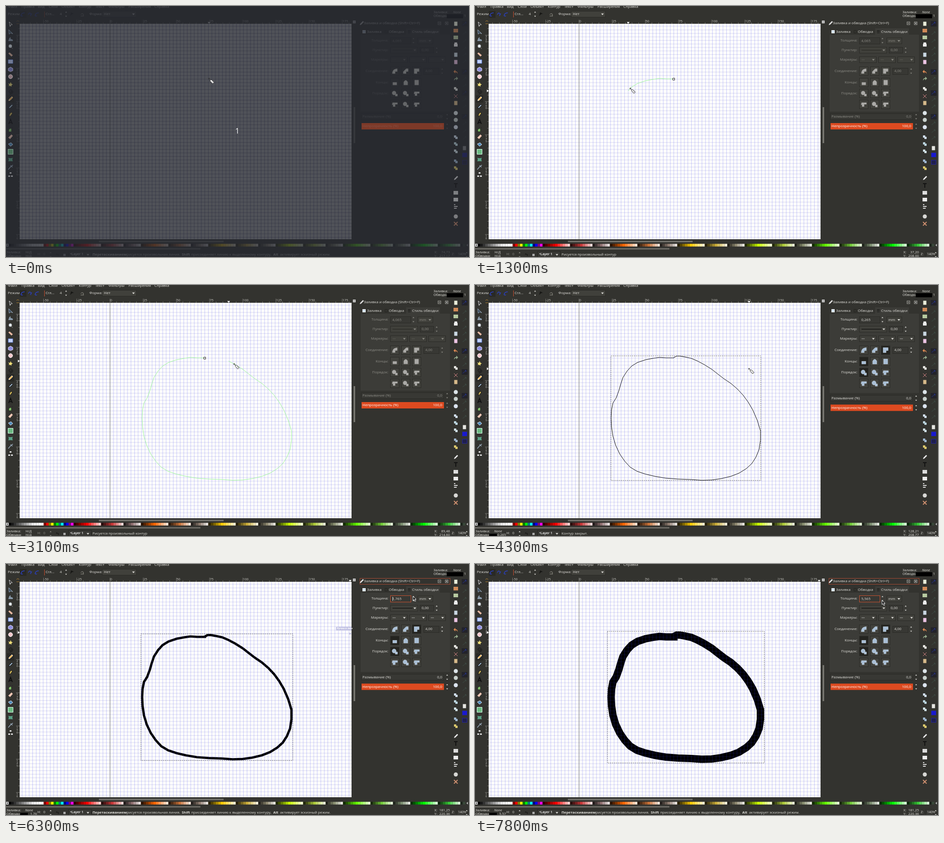
Animation, 1017 px wide and 551 px high, one loop 8000 ms. Source, as an HTML page with a canvas:

```html
<!DOCTYPE html>
<html lang="ru">
<head>
<meta charset="utf-8">
<style>
html, body { margin: 0; width: 100%; height: 100%; overflow: hidden; background: #33332f; }
canvas { display: block; }
</style>
</head>
<body>
<canvas id="stage" width="1017" height="551"></canvas>
<script>
const ctx = document.getElementById('stage').getContext('2d');
const BG = '#33332f', PANEL = '#3c3c38', FIELD = '#383834', EDGE = '#2a2a26';
const LIGHT = '#e0dfda', DIM = '#8d8c86', ORANGE = '#dd4a20', STEEL = '#a9bfd6';
const MM = 2.917, ZERO_X = 228, TOP_Y = 159, TOP_MM = 217.34;
const mmX = x => (x - ZERO_X) / MM, mmY = y => TOP_MM + (TOP_Y - y) / MM;
const pxX = v => ZERO_X + v * MM, pxY = v => TOP_Y + (TOP_MM - v) * MM;
const fmt = (v, n) => v.toFixed(n).replace('.', ',');

const OUTLINE = [
  [437,160],[420,160],[405,159],[391,161],[375,164],[357,170],[344,178],[334,189],[325,203],
  [320,218],[316,232],[310,248],[303,259],[300,274],[299,292],[300,312],[303,332],[309,352],
  [318,371],[329,387],[341,400],[356,409],[374,415],[395,420],[419,424],[446,426],[475,427],
  [498,428.7],[520,428],[541,425],[562,420],[580,413],[596,403],[608,392],[617,378],[624,361],
  [627,341],[627,320],[620,297],[610,274],[600,257],[589,242],[576,228],[562,216],[547,206],
  [534,196],[520,185],[504,175],[489,167],[475,161],[461,158],[450,156],[443,156],[437,159]];
const BOX = { left: 299, top: 156, right: 627.4, bottom: 428.7 };

// Each key: [time, value, ...]; values between keys are linear.
function along(keys, t) {
  let i = keys.findIndex(k => k[0] > t);
  if (i < 0) return keys[keys.length - 1].slice(1);
  if (i === 0) return keys[0].slice(1);
  const a = keys[i - 1], b = keys[i], f = (t - a[0]) / (b[0] - a[0]);
  return a.slice(1).map((v, n) => v + (b[n + 1] - v) * f);
}
function latest(keys, t) {
  return keys.reduce((v, k) => k[0] <= t ? k[1] : v, keys[0][1]);
}
const DRAWN = [[800, 0], [1300, 6.75], [1600, 13], [3100, 48], [3300, 53]];
const POINTER = [[3400, 437, 159], [4300, 602, 184], [4600, 756, 150], [4800, 893, 70],
  [7000, 893, 70], [7200, 893, 79]];
const WIDTHS = [[0, 0.265], [5700, 0.365], [5800, 0.465], [5900, 0.665], [6100, 1.065],
  [6200, 1.365], [6300, 1.765], [6400, 2.765], [6500, 4.265], [6700, 5.765], [7600, 5.665], [7800, 5.565]];

function pointAt(i) {
  const n = Math.min(Math.floor(i), OUTLINE.length - 2), f = i - n;
  const [a, b] = [OUTLINE[n], OUTLINE[n + 1]];
  return [a[0] + (b[0] - a[0]) * f, a[1] + (b[1] - a[1]) * f];
}

function rect(x, y, x2, y2, fill, stroke) {
  if (fill) { ctx.fillStyle = fill; ctx.fillRect(x, y, x2 - x, y2 - y); }
  if (stroke) {
    ctx.strokeStyle = stroke; ctx.lineWidth = 1;
    ctx.strokeRect(x + .5, y + .5, x2 - x - 1, y2 - y - 1);
  }
}
function text(s, x, y, color = LIGHT, { size = 8, style = '', align = 'left' } = {}) {
  ctx.font = `${style} ${size}px "Open Sans", "Noto Sans", sans-serif`;
  ctx.textAlign = align; ctx.textBaseline = 'middle'; ctx.fillStyle = color;
  ctx.fillText(s, x, y);
}
function icon(d, x, y, fill, stroke, width = 1) {
  const p = new Path2D(d);
  ctx.save(); ctx.translate(x, y);
  if (fill) { ctx.fillStyle = fill; ctx.fill(p); }
  if (stroke) { ctx.strokeStyle = stroke; ctx.lineWidth = width; ctx.stroke(p); }
  ctx.restore();
}
const DOWN = 'M-3-1.5H3L0 2Z', UP = 'M-2 1H2L0-1.5Z', LOW = 'M-2-1H2L0 1.5Z';
function spin(x, y, color) { icon(UP, x, y - 4.5, color); icon(LOW, x, y + 4.5, color); }
function combo(x, y, x2, color) {
  rect(x, y - 7, x2, y + 7, '#40403b', EDGE); icon(DOWN, x2 - 7, y, color);
}

const DISC = 'M4.5 0A4.5 4.5 0 1 1-4.5 0A4.5 4.5 0 1 1 4.5 0Z', SQUARE = 'M-5-4H5V4H-5Z';
const PAGE = 'M-3.5-4.5H3.5V4.5H-3.5Z', PEN = 'M-4 4L-3 1L3-5L5-3L-1 3Z';
const HOOK = 'M4 4Q4-2-1-2V-5L-5-1L-1 3V0Q2 0 4 4Z', PAIR = 'M-4-4H1V1H-4ZM-1-1H4V4H-1Z';
const CURVE = 'M-4 4Q-4-3 4-3M-4 4L0 4', CROSS = 'M-4-4L4 4M4-4L-4 4';
const TOOLS = [
  [40, 'M-3-5L4 1L0 1.5L-1 5Z', '#222', '#ddd'], [57, 'M-4-5L5 4L0 2L-3 5Z', '#345', '#9ab'],
  [73, 'M-5 4H5V1L0-1V-5L-3-2Z', '#8798a8'], [89, 'M3-1A3.5 3.5 0 1 1-4-1A3.5 3.5 0 1 1 3-1ZM2 2L5 5', '#e8f1fa', '#888'],
  [106, 'M-5-2L-2-4L5 2L2 5Z', '#e6b9a2'], [122, SQUARE, '#c3d3ff', '#5877c8'],
  [139, 'M0-5L5-2V3L0 5L-5 3V-2Z', '#8f8fe0', '#dde'], [155, DISC, '#f6c8cc', '#fff'],
  [172, 'M0-5L2-1L5 0L2 2L2 5L-1 3L-4 4L-3 1L-5-2L-1-1Z', '#f2e07a'],
  [188, 'M0 0Q3-2 2 2Q-4 4-3-2Q1-7 5 0Q4 6-2 5', null, '#111'], [204, PEN, '#f5a834', '#fff'],
  [221, PEN, '#9fb8d0', '#111'], [238, 'M-3 5L-2-1L2-5L4-2L0 3Z', '#c8b058', '#111'],
  [254, 'M-4 5L0-5L4 5M-2 2H3', null, '#111', 2], [271, 'M-4 5V0L-1-2H2V5ZM3-4H5', '#7fbf67', '#222'],
  [287, 'M-5 2L2-5L5-2L-1 5Z', '#f0c7b5'], [304, 'M-5-1L1-4L5 0L0 4Z', '#4f8ebc', '#dde'],
  [320, 'M-5.5-5.5H5.5V5.5H-5.5Z', '#6cba82', '#dfe'], [337, 'M-5-4Q0-2 5-4Q3 0 5 4Q0 3-5 4Q-3 0-5-4Z', '#5aa085'],
  [354, 'M-5 5L1-2M0-4L4 0M2-2L5-5', null, '#9ab', 1.5], [370, 'M-2-5H2V-2H-2ZM-5 2H-1V5H-5ZM1 2H5V5H1Z', '#ddd']];
const COMMANDS = [
  [39, PAGE, '#e9edda'], [54, SQUARE, '#d08a58'], [69, SQUARE, '#b7c9a0'], [85, 'M-4-2H4V4H-4ZM-3-5H3V-2H-3Z', '#eee'],
  [107, PAGE, '#c9d7e2'], [123, PAGE, '#edc4e4'], [145, HOOK, '#df8a54'], [160, 'M-4 4Q-4-2 1-2V-5L5-1L1 3V0Q-2 0-4 4Z', '#9ab090'],
  [182, PAIR, '#e4e4df'], [198, CROSS, null, '#d88'], [213, PAGE, '#d6b98a'], [235, DISC, '#dce4e8'], [250, DISC, '#c8d0cc'],
  [266, DISC, '#dce4f0'], [288, PAIR, '#cfdcea'], [303, PAIR, '#b9d3dd'], [319, PAIR, '#cfdfe4'], [341, PAIR, '#9db6d0'],
  [356, PAIR, '#d8c56b'], [378, PEN, '#eee'], [394, 'M-4-4H4M0-4V5', null, '#111', 2], [410, SQUARE, '#ddd'],
  [425, SQUARE, '#eee'], [440, 'M-4-4H-1M-4 0H4M-4 4H2', null, '#ddd', 2], [462, DISC, '#d8d8d5'], [478, CROSS, null, '#d09070', 2]];
const SNAPS = [[39, 1], [60, 0], [77, 0], [94, 0], [107, 0], [122, 0], [145, 1], [160, 0], [175, 0],
  [191, 1], [206, 0], [221, 0], [243, 1], [258, 0], [275, 0], [290, 0]];
const JOINS = [['M-5.5 5.5Q-5.5-5 5.5-5.5V1H1V5.5Z', 854, 143], ['M-5.5 5.5V1L1-5.5H5.5V1H1V5.5Z', 878, 143],
  ['M-5.5 5.5V-5.5H5.5V1H1V5.5Z', 902, 143], ['M-4.5-.5H4.5V5.5H-4.5Z', 854, 168],
  ['M-4.5 5.5V-1Q0-9 4.5-1V5.5Z', 878, 168], ['M-4.5-5.5H4.5V5.5H-4.5Z', 902, 168]];
const MARK = 'M-6-1A4.5 4.5 0 1 1 3-1A4.5 4.5 0 1 1-6-1ZM1 1H6V6H1Z', BEND = 'M-5-4H6V0H1V5H-4V1H-6Z';
const ORDERS = [[MARK, 854, 192], [MARK, 878, 192], [BEND, 902, 192], [BEND, 854, 216], [MARK, 878, 216], [BEND, 902, 216]];

function drawIcons(active) {
  rect(2, 196, 18, 212, '#292925');
  for (const [y, d, fill, stroke, w] of TOOLS) icon(d, 10, y, fill, stroke, w);
  for (const [y, d, fill, stroke, w] of COMMANDS) icon(d, 988, y, fill, stroke, w);
  for (const [d, x, y] of [...JOINS, ...ORDERS]) icon(d, x, y, active ? STEEL : '#aaa9a6', active ? '#d5e2ef' : null, .5);
}

function drawGrid(vertical, horizontal) {
  const step = MM * 25.4 / 9.6;
  ctx.fillStyle = vertical;
  for (let x = ZERO_X - 25 * step; x < 759; x += step) ctx.fillRect(x, 39, .7, 473);
  ctx.fillStyle = horizontal;
  for (let y = pxY(0) - 97 * step; y < 512; y += step) if (y > 39) ctx.fillRect(30, y, 729, .7);
}

function drawRulers(x, y) {
  ctx.save();
  ctx.beginPath(); ctx.rect(22, 29, 737, 483); ctx.clip();
  ctx.fillStyle = '#a5a49f';
  for (let v = -70; v <= 185; v += 5) {
    const major = v % 25 === 0, h = major ? 9 : 3;
    if (pxX(v) > 30) ctx.fillRect(pxX(v), 39 - h, .6, h);
    if (major && pxX(v) > 30) text(v, pxX(v) + 1, 34, '#c9c8c3', { size: 7 });
    ctx.fillStyle = '#a5a49f';
  }
  for (let v = 95; v <= 255; v += 5) {
    const major = v % 25 === 0, w = major ? 8 : 3;
    ctx.fillRect(30 - w, pxY(v), w, .6);
    if (major) [...String(v)].forEach((c, i) => text(c, 23, pxY(v) + 4 + i * 5.5, '#c9c8c3', { size: 6 }));
    ctx.fillStyle = '#a5a49f';
  }
  ctx.restore();
  icon('M-3-2H3L0 2Z', Math.min(x, 756), 37, '#fff');
  icon('M-2-3V3L2 0Z', 28, y, '#fff');
}

function drawPalette() {
  const grays = [0, 10, 20, 30, 40, 50, 60, 70, 80, 90, 92.5, 95, 97.5, 100].map(l => `hsl(0 0% ${l}%)`);
  const basics = ['maroon', 'red', 'olive', 'yellow', 'green', 'lime', 'teal', 'aqua', 'navy', 'blue', 'purple', 'fuchsia'];
  const colors = [...grays, ...basics];
  for (let hue = 0; hue <= 120; hue += 24)
    for (const [sat, n] of [[100, 12], [57, 10], [12, 8]])
      for (let i = 1; i < n; i++) colors.push(`hsl(${hue} ${sat}% ${i / n * 100}%)`);
  rect(0, 522, 6, 528, '#ddd'); icon('M-2-2L2 2M2-2L-2 2', 3, 525, null, '#333');
  colors.forEach((c, i) => { const x = 6 + i * 5.48; if (x < 1008) rect(x, 522, Math.min(x + 5.5, 1009), 528, c); });
  icon('M1.5-3V3L-1.5 0Z', 1013, 525, '#ccc');
}

function drawToolbars() {
  [['Файл', 4], ['Правка', 34], ['Вид', 70], ['Слой', 94], ['Объект', 122], ['Контур', 160], ['Текст', 196],
    ['Фильтры', 225], ['Расширения', 269], ['Справка', 326]].forEach(([s, x]) => text(s, x, 1.5));
  text('Режим:', 4, 18);
  rect(30, 11, 45, 26, '#292925');
  for (const x of [37, 53, 68]) icon(x === 53 ? 'M-4 1Q-1-6 2 0L4-1M2 0L1 4' : CURVE, x, 18, null, '#2a3fc0', 1.5);
  rect(84, 12, 85, 25, '#d05030');
  text('Сгл...', 87, 18); text('4', 118, 18); spin(132, 18, LIGHT);
  icon('M-4 4L-2-4L4-1L0 0Z', 145, 18, '#161614'); icon('M-3 3H4M-3 0Q0-4 3-1V3', 167, 19, null, '#99988f');
  text('Форма:', 183, 18); combo(211, 18, 287, LIGHT); text('Нет', 215, 18);
  text('Заливка:', 939, 14, LIGHT, { size: 7.5 }); text('None', 982, 14, LIGHT, { size: 7.5, style: 'italic' });
  text('Обводка:', 939, 22, LIGHT, { size: 7.5 }); rect(968, 18, 1004, 27, '#000'); text('1', 1006, 22, LIGHT, { size: 7.5 });
  icon('M-3-2L0-4L3-2M-3 3H3', 26, 36, null, '#b08030'); rect(762, 32, 768, 38, '#aaa', '#ddd');
  for (const [y, on] of SNAPS) {
    if (on) rect(1001, y - 6, 1014, y + 6, '#23232a');
    icon('M-4 3L3-3M1-4L4-3L3 0', 1007, y, null, on ? '#26358e' : '#3d4d46');
  }
  icon(PAGE, 1007, 312, '#e5e5e0');
  for (const y of [327, 343]) rect(1002, y - 5, 1013, y + 5, y === 327 ? '#1919d0' : '#20204c', '#2222a0');
}

function drawPanel(t, width) {
  const active = t >= 3500, focus = t >= 5600, c = active ? LIGHT : DIM, right = { align: 'right' };
  if (focus) rect(777, 31, 976, 45, null, '#a64a33');
  icon(PEN, 781, 38, '#ddd'); text('Заливка и обводка (Shift+Ctrl+F)', 786, 38);
  for (const x of [952, 968]) rect(x - 3.5, 34.5, x + 3.5, 41.5, null, '#aaa9a4');
  icon('M-1.5-1.5L1.5 1.5M1.5-1.5L-1.5 1.5', 968, 38, null, '#ddd');
  icon('M-1.5 0H1.5', 952, 38, null, '#ddd');
  rect(779, 63, 975, active ? 237 : 232, PANEL); rect(879, 49, 953, 64, PANEL);
  rect(783, 53, 790, 60, '#cfe0f4', '#fff'); text('Заливка', 793, 56.5);
  rect(832, 53, 838, 60, null, '#24241f'); text('Обводка', 841, 56.5);
  icon('M-3-2H3M-3 0H3M-3 3H3', 886, 56, null, '#171714'); text('Стиль обводки', 892, 56.5);
  [['Толщина:', 76], ['Пунктир:', 97], ['Маркеры:', 118], ['Соединение:', 143], ['Концы:', 168], ['Порядок:', 192]]
    .forEach(([s, y]) => text(s, 840, y, c, right));
  rect(844, 69, 890, 84, FIELD, focus ? '#c9512f' : EDGE);
  text(active ? fmt(width, 3) : '4,065', 848.5, 76.5, c); spin(895, 76, c);
  if (focus && t < 6900) rect(849, 72, 850, 81, LIGHT);
  combo(904, 76.5, 938, c); text('mm', 908, 76.5, c);
  combo(844, 97, 905, c); rect(849, 96.5, 893, 97.5, active ? '#000' : '#22221f');
  rect(909, 90, 940, 104, FIELD, EDGE); text('0,00', 913, 97, c); spin(946, 97, c);
  for (const x of [844, 886, 928]) { combo(x, 118, x + 38, c); rect(x + 5, 117.5, x + 12, 118.5, active ? '#aaa' : '#5b5b55'); }
  for (const [, x, y] of [...JOINS, ...ORDERS]) {
    const on = active && (x === 902 && y === 143 || x === 854 && (y === 168 || y === 192));
    rect(x - 10, y - 10, x + 10, y + 10, on ? '#242420' : '#42423d', EDGE);
  }
  rect(917, 136, 952, 151, FIELD, EDGE); text('4,00', 921, 143, c); spin(958, 143, c);
  const shift = active ? 5.5 : 0;
  rect(780, 236 + shift, 962, 250 + shift, FIELD, EDGE);
  text('Размывание (%)', 783, 243 + shift, c); text('0,0', 958, 243 + shift, c, right); spin(969, 243 + shift, c);
  rect(781, 257 + shift, 962, 271 + shift, ORANGE);
  text('Непрозрачность (%)', 783, 264 + shift, '#fff'); text('100,0', 958, 264 + shift, '#fff', right); spin(969, 264 + shift, c);
}

function drawStatus(t, width, x, y) {
  const small = { size: 7.5 }, right = { size: 7.5, align: 'right' }, active = t >= 3500;
  text('Заливка:', 1, 541, LIGHT, small); text('Обводка:', 1, 549, LIGHT, small);
  if (active) {
    text('None', 42, 541, LIGHT, { size: 7.5, style: 'italic' });
    rect(31, 546, 48, 551, '#000'); text(fmt(width, width < 1 ? 3 : 2), 68, 549, LIGHT, right);
  } else { text('Н/Д', 43, 541, LIGHT, small); text('Н/Д', 43, 549, LIGHT, small); }
  text('H:', 69, 545.5, active ? LIGHT : DIM, small); text('0', 82, 545.5, active ? LIGHT : DIM, small);
  spin(98, 546, active ? LIGHT : DIM);
  icon('M-3-1H2V3M-3-1L-1-3', 113, 546, null, '#111'); rect(126, 544, 131, 549, '#aaa');
  rect(137, 538, 188, 553, FIELD, '#242420'); text('•Layer 1', 141, 545.5, '#fff', { size: 7.5, style: '600' }); icon(DOWN, 180, 546, LIGHT);
  const bold = { size: 7.8, style: 'bold' }, plain = { size: 7.8 };
  if (t < 700 || t >= 5400) {
    text('Перетаскиванием', 190, 545.5, LIGHT, bold); text('рисуется произвольная линия.', 265, 545.5, LIGHT, plain);
    text('Shift', 386, 545.5, LIGHT, bold); text('присоединяет линию к выделенному контуру,', 407, 545.5, LIGHT, plain);
    text('Alt', 587, 545.5, LIGHT, bold); text('активирует эскизный режим.', 602, 545.5, LIGHT, plain);
  } else text(active ? 'Контур закрыт.' : 'Рисуется произвольный контур', 190, 545.5, LIGHT, plain);
  text('X:', 941, 541, LIGHT, small); text('Y:', 941, 549, LIGHT, small);
  text(fmt(mmX(x), 2), 975, 541, LIGHT, right); text(fmt(mmY(y), 2), 975, 549, LIGHT, right);
  text('Z:', 979, 545.5, LIGHT, small); rect(990, 538, 1008, 553, FIELD, EDGE); text('140%', 993, 545.5, LIGHT, { size: 7 }); spin(1012, 546, LIGHT);
}

function drawCanvas(t, width, drawn) {
  rect(30, 39, 759, 512, '#fdfdfc');
  if (t >= 3500) {
    ctx.beginPath(); OUTLINE.forEach(p => ctx.lineTo(...p)); ctx.closePath();
    ctx.strokeStyle = '#000'; ctx.lineWidth = Math.max(1, width * MM); ctx.stroke();
  }
  drawGrid('rgba(40,40,255,.34)', 'rgba(65,65,190,.27)');
  rect(228, 39, 229, 512, '#70717c');
  if (t >= 800 && t < 3500) {
    ctx.beginPath(); OUTLINE.slice(0, Math.floor(drawn) + 1).forEach(p => ctx.lineTo(...p));
    ctx.lineTo(...pointAt(drawn));
    ctx.strokeStyle = '#9cf797'; ctx.lineWidth = 1; ctx.stroke();
    rect(434, 158, 439, 163, '#fff', '#222');
  }
  if (t >= 3500) {
    const h = width * MM / 2;
    ctx.strokeStyle = '#333'; ctx.lineWidth = .8; ctx.setLineDash([2.1, 2.1]);
    ctx.strokeRect(BOX.left - h, BOX.top - h, BOX.right - BOX.left + 2 * h, BOX.bottom - BOX.top + 2 * h);
    ctx.setLineDash([]);
  }
  if (t >= 4600 && t < 6700) {
    rect(725, 138, 759, 146, '#c3c3e3'); text('Ручка к лин', 727, 142, '#fff', { size: 5.5, style: 'bold' });
    icon('M-2-2L2 2M2-2L-2 2', 756, 153, null, '#a0a0cc');
  }
}

function drawPointer(x, y) {
  if (x > 759) return icon('M0 0L0 9L2.2 7L4 11L6 10L4 6.5H7Z', x + 1, y + 1, '#161616', '#fff', .9);
  icon('M-2 0H2M0-2V2', x, y, null, '#333');
  icon('M2 2L6 3L11 8L8 11L3 6Z', x, y, '#fff', '#222', .9);
  icon('M5 7L8 4M7 9L10 6', x, y, null, '#444', .7);
}

function render(time) {
  const t = Math.floor(time % 8000 / 100) * 100;
  const drawn = along(DRAWN, t)[0], width = latest(WIDTHS, t);
  let pointer, tip;
  if (t < 800) tip = pointer = [446, 159.5];
  else if (t < 3500) { tip = pointAt(drawn); pointer = pointAt(along(DRAWN, t - 35)[0]); }
  else { pointer = along(POINTER, t); tip = pointer[0] > 756 ? [756.7, 150.2] : pointer; }

  rect(0, 0, 1017, 551, BG);
  drawToolbars();
  drawCanvas(t, width, drawn);
  drawRulers(...tip);
  rect(204, 515.5, 478, 518.5, '#777670'); rect(763.5, 222, 767, 301, '#777670');
  drawPalette();
  rect(0, 531.5, 427, 534.5, '#6f6d67');
  drawPanel(t, width);
  drawIcons(t >= 3500);
  drawStatus(t, width, ...tip);
  if (t < 200) {
    rect(0, 0, 1017, 551, 'rgba(38,41,48,.8)');
    drawGrid('rgba(20,22,30,.25)', 'rgba(20,22,30,.25)');
    ctx.globalAlpha = .35;
    drawIcons(false); rect(781, 257, 962, 271, ORANGE);
    ctx.globalAlpha = 1;
    text('1', 508, 276, '#fff', { size: 16, align: 'center' });
  }
  drawPointer(...pointer);
  requestAnimationFrame(now => render(now - start));
}
const start = performance.now();
render(0);
</script>
</body>
</html>
```
